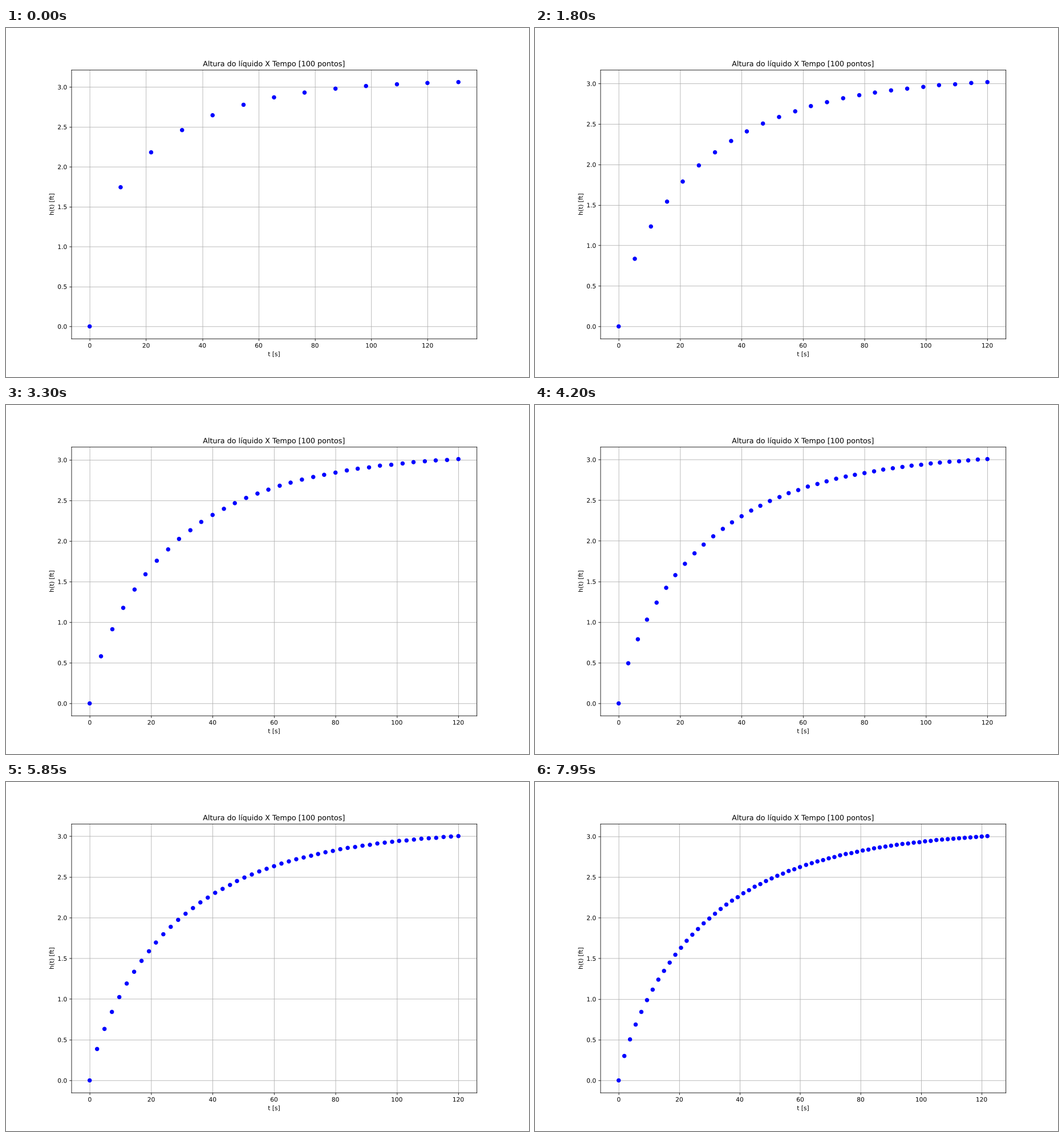
A matplotlib script that plays this animation: 917x611 px, repeating every 8 s.

```python
import numpy as np
import matplotlib.pyplot as plt
from matplotlib.animation import FuncAnimation
from matplotlib.lines import Line2D
from matplotlib.path import Path
from matplotlib.patheffects import AbstractPathEffect, Normal
from matplotlib.spines import Spine
from matplotlib.text import Text
from matplotlib.transforms import Affine2D

WIDTH, HEIGHT, DPI = 917, 611, 76.4
CELL = np.array([WIDTH / 1200, HEIGHT / 800])   # plot laid out on 1200 x 800
TICK_MS, LOOP_MS = 50, 8000
TICKS_PER_STEP = 3
FIRST_COUNT = 11          # Euler steps in the first picture
T_END = 120
INFLOW, OUTFLOW = 0.16, 0.091


class SnapLines(AbstractPathEffect):
    """Centre straight lines on cells of the layout grid."""

    def draw_path(self, renderer, gc, tpath, affine, rgbFace=None):
        path = affine.transform_path(tpath)
        corners = (np.round(path.vertices / CELL) + [0.5, -0.5]) * CELL
        soft = renderer.new_gc()
        soft.copy_properties(gc)
        soft.set_snap(False)
        renderer.draw_path(soft, Path(corners, path.codes), Affine2D(), rgbFace)
        soft.restore()


class SnapMarkers(AbstractPathEffect):
    """Put marker centres on corners of the layout grid."""

    def draw_path(self, renderer, gc, tpath, affine, rgbFace=None):
        centre = affine.transform((0, 0))
        shift = np.round(centre / CELL) * CELL - centre
        renderer.draw_path(gc, tpath, affine + Affine2D().translate(*shift),
                           rgbFace)


def euler(count):
    """Tank level h' = INFLOW - OUTFLOW * sqrt(h), stepped until past T_END."""
    dt = T_END / count
    times, levels = [0.0], [0.0]
    while times[-1] <= T_END:
        h = levels[-1]
        levels.append(h + dt * (INFLOW - OUTFLOW * h ** 0.5))
        times.append(times[-1] + dt)
    return times, levels


def add_effect(kind, effect):
    for artist in ax.findobj(kind):
        artist.set_path_effects([effect])


plt.rcParams["text.hinting"] = "none"

# The tiny margin keeps the pixel size from being truncated.
fig, ax = plt.subplots(
    figsize=((WIDTH + 1e-6) / DPI, (HEIGHT + 1e-6) / DPI), dpi=DPI)
points, = ax.plot([], [], "bo")
ax.set_title("Altura do líquido X Tempo [100 pontos]")
ax.set_xlabel("t [s]")
ax.set_ylabel("h(t) [ft]")
ax.set_xticks(np.arange(0, 121, 20))
ax.set_yticks(np.arange(0, 3.1, 0.5))
ax.grid(True)

# Text as outlines and soft-edged lines allow positions between pixels.
add_effect(Text, Normal())
add_effect(Line2D, SnapLines())
add_effect(Spine, SnapLines())
points.set_path_effects([SnapMarkers()])


def update(frame):
    points.set_data(*euler(FIRST_COUNT + frame // TICKS_PER_STEP))
    ax.relim()
    ax.autoscale_view()
    return points,


anim = FuncAnimation(fig, update, frames=LOOP_MS // TICK_MS,
                     interval=TICK_MS, repeat=True, repeat_delay=0)
plt.show()
```
